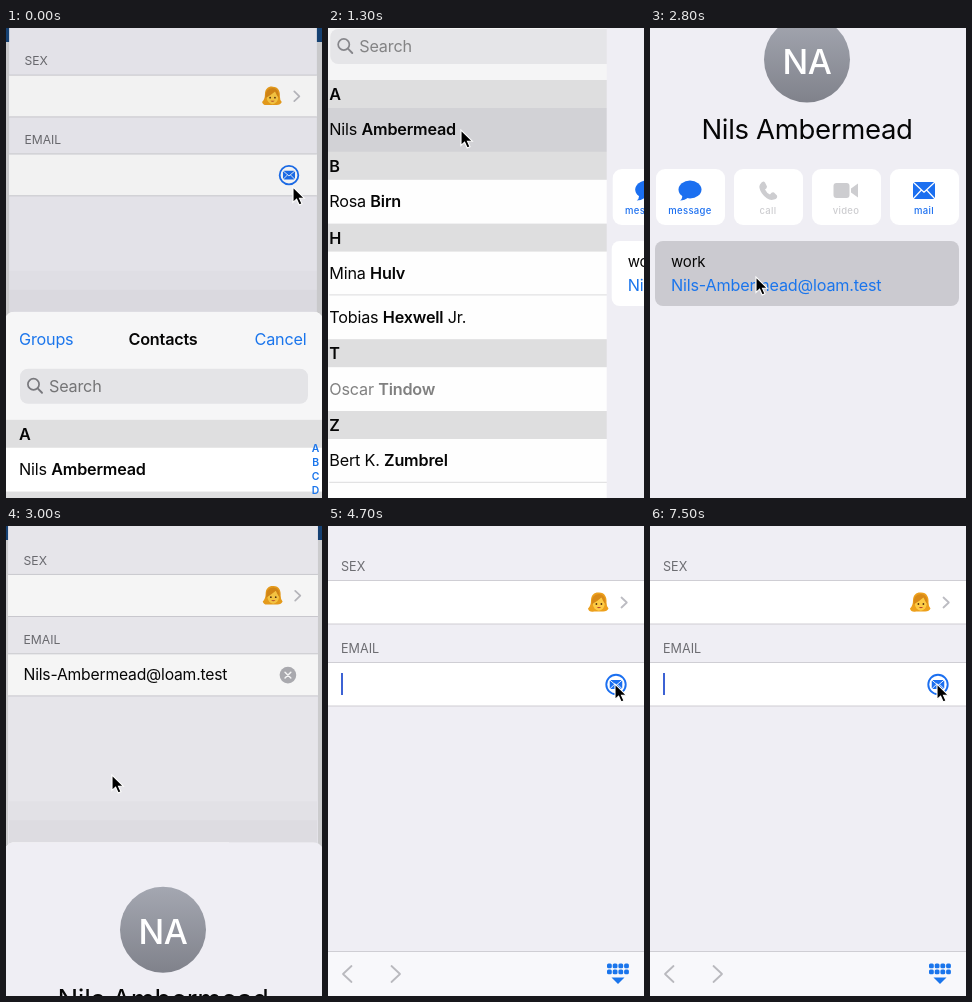
These frames come from a looping animation (316x470 px, 7600 ms). An HTML page:

```html
<!DOCTYPE html>
<html lang="en">
<head>
<meta charset="utf-8">
<title>Contact picker</title>
<style>
  html, body { margin: 0; width: 100%; height: 100%; overflow: hidden; background: #efeef4; }
  svg { display: block; width: 316px; height: 470px; }
  text { font: 400 16.2px Inter, Arial, sans-serif; letter-spacing: -.012em; fill: #060606; white-space: pre; }
  .b { font-weight: 600; }
  .blue { fill: #1a75ec; }
  .mid { text-anchor: middle; }
  .end { text-anchor: end; }
  .cap { font-size: 12.6px; fill: #6d6d72; letter-spacing: 0; }
  .index { font-size: 10.4px; font-weight: 600; text-anchor: middle; fill: #1a75ec; }
  .tag { font-size: 9.5px; font-weight: 500; letter-spacing: .035em; text-anchor: middle; }
  .line { fill: none; stroke-linecap: round; stroke-linejoin: round; }
</style>
</head>
<body>
<svg id="stage" viewBox="0 0 316 470"></svg>
<script>
const LOOP = 7600, STEP = 100;
const EMAIL = 'Nils-Ambermead@loam.test';
const BLUE = '#1b6ff0', PALE = '#cdcdd0';

const rect = (x, y, w, h, fill, extra = '') =>
  `<rect x="${x}" y="${y}" width="${w}" height="${h}" fill="${fill}" ${extra}/>`;
const text = (x, y, str, cls = '', extra = '') =>
  `<text x="${x}" y="${y}" class="${cls}" ${extra}>${str}</text>`;
const line = (d, color, width, extra = '') =>
  `<path class="line" d="${d}" stroke="${color}" stroke-width="${width}" ${extra}/>`;
const at = (x, y, body, id = '') => `<g ${id && `id="${id}"`} transform="translate(${x} ${y})">${body}</g>`;

const envelope = (w, h, fold) =>
  rect(-w / 2, -h / 2, w, h, BLUE, 'rx="1.5"') +
  line(`M${-w / 2} ${-h / 2}L0 ${h * .1}L${w / 2} ${-h / 2}M${-w / 2} ${h / 2}L${-w * .14} 0M${w / 2} ${h / 2}L${w * .14} 0`, '#fff', fold);

const woman = `
  <path d="M-10 6Q-7 3-7-2C-7-8-3-10.500 1-10C7-10 9-5 8.500 0Q8.500 4 10.500 6Q9 9.500 4 9H-4Q-9 10-10 6Z" fill="#eda01c"/>
  <ellipse cx=".8" cy="1" rx="6" ry="7.200" fill="#fdcb45"/>
  <path d="M-6.500 2Q-7-8 1-8.500Q8-8 7.500 2Q5-1 3.500-5Q-1-1-6.500 2Z" fill="#d98a17"/>
  <circle cx="-1.600" cy="1.500" r=".9" fill="#553311"/><circle cx="3.400" cy="1.500" r=".9" fill="#553311"/>
  <path d="M-1.400 4.600Q.9 6.800 3.200 4.600Z" fill="#b8402c"/>`;

function keypad() {
  let out = '<path d="M-6.500 5H6.500L0 11.500Z" fill="#1a75ec"/>';
  for (let i = 0; i < 8; i++)
    out += rect(-11 + (i % 4) * 5.7, -9 + (i >> 2) * 6, 4.8, 4.8, '#1a75ec', 'rx="1.5"');
  return out;
}

function form() {
  const edge = '#cfced4';
  const row = (y, h) => rect(-3, y, 320, h, '#fff') +
    rect(-3, y - .5, 320, 1, edge) + rect(-3, y + h - .5, 320, 1, edge);
  return rect(-3, -20, 320, 560, '#efeef4') +
    text(13, 44.5, 'SEX', 'cap') + row(54.5, 43.5) + at(270, 76.5, woman) +
    line('M293.500 71.500L298.800 76.500L293.500 81.500', '#bcbcc2', 1.8) +
    text(13, 126.5, 'EMAIL', 'cap') + row(136.5, 43.5) +
    text(13, 164, EMAIL, '', 'id="email"') +
    rect(13, 147, 2, 22, '#3c62d4', 'id="caret"') +
    at(288, 158.5, `<circle r="9.700" fill="#fff" stroke="${BLUE}" stroke-width="1.900"/>` + envelope(12.5, 9, .9), 'mail') +
    at(286, 158.5, '<circle r="8.600" fill="#b0b0b5"/>' + line('M-3-3L3 3M3-3L-3 3', '#fff', 1.5), 'clear') +
    at(0, 0, rect(-3, 425, 320, 120, '#f8f8fb') + rect(-3, 425, 320, 1, '#cfced4') +
      line('M23.500 440L15 448L23.500 456', '#b9b9be', 1.8) +
      line('M63.500 440L72 448L63.500 456', '#b9b9be', 1.8) + at(290, 446.5, keypad()), 'bar');
}

function list() {
  const people = [
    ['A', 'Nils', 'Ambermead'], ['B', 'Rosa', 'Birn'], ['H', 'Mina', 'Hulv'],
    ['', 'Tobias', 'Hexwell', ' Jr.'], ['T', 'Oscar', 'Tindow'], ['Z', 'Bert K.', 'Zumbrel']
  ];
  let y = 108;
  let out = rect(-2, 0, 320, 560, '#fff') + rect(-2, 0, 320, 108, '#f6f6f7') +
    text(13, 33, 'Groups', 'blue') + text(157, 33, 'Contacts', 'b mid') + text(300.5, 33, 'Cancel', 'blue end') +
    at(0, 0, rect(14, 57, 288, 35, '#e4e4e7', 'rx="8"') +
      '<circle cx="27.500" cy="72.500" r="5.600" fill="none" stroke="#78787d" stroke-width="1.700"/>' +
      line('M31.700 76.700L36 81', '#78787d', 1.9) + text(43, 80, 'Search', '', 'fill-opacity=".5"'), 'search');
  people.forEach(([head, first, last, tail = ''], i) => {
    if (head) {
      out += rect(-2, y, 320, 28, '#dfdfe0') + text(13, y + 20, head, 'b');
      y += 28;
    } else out += rect(13, y - 1, 289, 1, '#dcdcde');
    if (!i) out += rect(-2, y, 320, 44, '#d3d3d7', 'id="pick"');
    out += text(13, y + 27.3, `${first} <tspan class="b">${last}</tspan>${tail}`, '', head === 'T' ? 'opacity=".5"' : '');
    y += 43.8;
  });
  out += rect(13, y - 1, 289, 1, '#dcdcde');
  [...'ABCDEFGHIJKLMNOPQRSTUVWXYZ#'].forEach((c, i) => out += text(309.5, 140.7 + i * 14, c, 'index'));
  return out;
}

function detail() {
  const icons = [
    ['message', BLUE, `<ellipse cy="-1" rx="11.500" ry="9" fill="${BLUE}"/><path d="M-8 4Q-7 8-10 10Q-5 10-2 7Z" fill="${BLUE}"/>`],
    ['call', PALE, `<path d="M-8-6Q-5-11-3-8L-1-4Q-1-2-3-1Q-1 3 2 4Q4 1 6 2L9 5Q10 8 6 9Q0 11-6 3Q-10-3-8-6Z" fill="${PALE}"/>`],
    ['video', PALE, rect(-12.5, -7.5, 16, 15, PALE, 'rx="3"') + `<path d="M5-2L12-7V7L5 2Z" fill="${PALE}"/>`],
    ['mail', BLUE, envelope(22, 17, 1.2)]
  ];
  return rect(0, -60, 330, 580, '#efeef4') +
    '<circle cx="157" cy="31.500" r="43" fill="url(#grey)"/>' +
    text(157, 45.5, 'NA', 'mid', 'style="font-size:34px;font-weight:500;fill:#fff"') +
    text(157, 111, 'Nils Ambermead', 'mid', 'style="font-size:27.5px"') +
    icons.map(([name, color, icon], i) => at(6 + i * 78, 141,
      rect(0, 0, 69, 56, '#fff', 'rx="9"') + at(34, 21.5, icon) +
      text(34, 44.5, name, 'tag', `style="fill:${color}"`))).join('') +
    rect(5, 213, 304, 65, '#fff', 'rx="8" id="card"') +
    text(21, 239, 'work', '', 'style="font-size:15px"') + text(21, 262.5, EMAIL, 'blue');
}

stage.innerHTML = `<defs>
  <linearGradient id="grey" x2="0" y2="1"><stop stop-color="#a4a7b1"/><stop offset="1" stop-color="#80828b"/></linearGradient>
  <clipPath id="round"><rect x="-2" width="320" height="580" rx="11"/></clipPath></defs>` +
  rect(0, 0, 316, 470, '#d4d4d6') + rect(0, 0, 316, 14, '#174478') +
  at(0, 0, form(), 'form') + rect(0, 0, 316, 470, '#000', 'id="dim"') +
  at(0, 0, rect(3, -41, 308, 60, '#000', 'opacity=".015"') + rect(3, -22, 308, 41, '#000', 'opacity=".025"'), 'shadow') +
  `<g id="sheet" clip-path="url(#round)">` +
  at(0, 0, list(), 'list') + rect(-2, 0, 320, 560, '#000', 'id="shade"') + at(0, 56, detail(), 'detail') + '</g>' +
  `<path id="arrow" d="M0 0V15.500L3.600 12.200L6.200 18L9 16.800L6.500 11.200H11.300Z" fill="#000" stroke="#fff" stroke-width="1.100"/>`;

const el = id => document.getElementById(id);
const move = (id, x, y, more = '') => el(id).setAttribute('transform', `translate(${x} ${y})${more}`);
const fade = (id, v) => el(id).setAttribute('opacity', v);
const clamp = v => Math.min(1, Math.max(0, v));
const smooth = v => v * v * (3 - 2 * v);

// Critically damped spring from 0 to 1
const spring = (t, start, speed) => {
  const k = Math.max(0, t - start) * speed;
  return 1 - (1 + k) * Math.exp(-k);
};

const path = [
  [0, 287, 159], [800, 287, 159], [1100, 133, 102], [2000, 133, 102],
  [2600, 106, 249], [3800, 106, 249], [4500, 287, 158], [LOOP, 287, 158]
];
function pointer(t) {
  const i = path.findIndex(p => p[0] > t);
  const [t0, x0, y0] = path[i - 1], [t1, x1, y1] = path[i];
  const k = smooth((t - t0) / (t1 - t0));
  return [x0 + (x1 - x0) * k, y0 + (y1 - y0) * k];
}

function blink(t) {
  const p = t % 1000;
  return p < 500 ? clamp((p - 150) / 250) : clamp((1000 - p) / 150);
}

function draw(t) {
  const closing = t >= 2900;
  let up = closing ? 1 - spring(t, 2850, .0165) : spring(t, -66.3, .0188);
  if (t >= 3500) up = 0;
  const s = 1 - .108 * up;
  move('form', 157 * (1 - s), -15 * up, ` scale(${s})`);
  fade('dim', .14 * up);
  for (const id of ['sheet', 'shadow']) {
    move(id, 0, 470 - 526 * up);
    fade(id, up > 0 ? 1 : 0);
  }

  const push = t >= 2000 ? 1 : t < 1300 ? 0 : spring(t, 1250, .0121);
  move('list', -95 * push, 0);
  move('detail', 318 * (1 - push), 56);
  fade('search', 1 - push);
  fade('shade', .03 * push);
  fade('pick', t >= 1300 ? 1 : 0);
  el('card').setAttribute('fill', t >= 2700 ? '#cbcad0' : '#fff');

  const filled = closing && t < 4600;
  fade('email', filled ? 1 : 0);
  fade('clear', filled ? 1 : 0);
  fade('mail', filled ? 0 : 1);
  el('caret').setAttribute('x', filled ? 13 + el('email').getComputedTextLength() : 13);
  fade('caret', t >= 3400 ? blink(t) : 0);
  move('bar', 0, closing ? 130 * up : 130);
  move('arrow', ...pointer(t));
}

const begin = performance.now();
function tick() {
  const t = (performance.now() - begin) % LOOP;
  draw(Math.floor(t / STEP) * STEP);
  requestAnimationFrame(tick);
}
tick();
</script>
</body>
</html>
```
